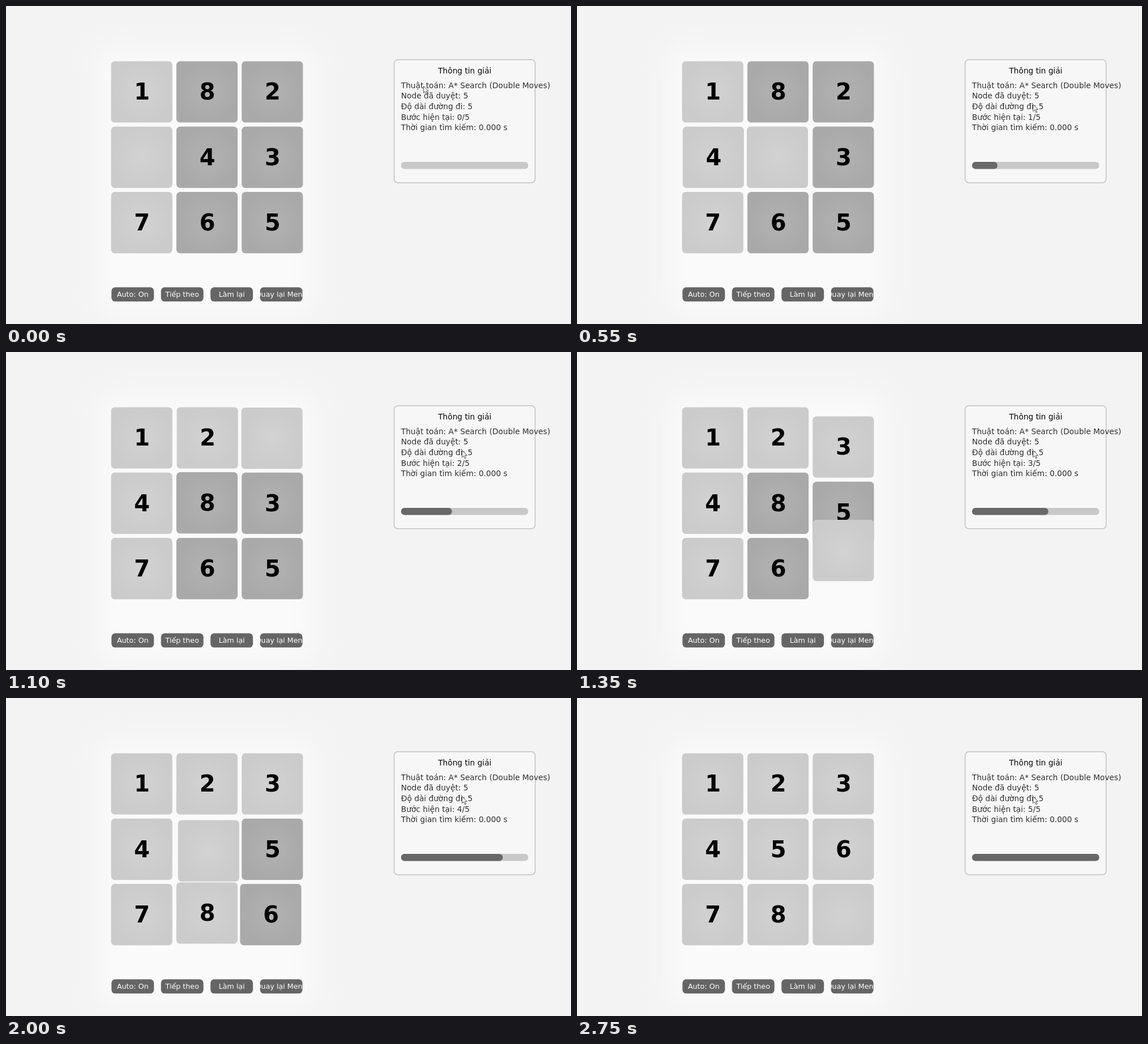
Recreate the animation shown at these times as an HTML page. Size 998 by 561 pixels, loop 2900 ms.

```html
<!DOCTYPE html>
<html lang="vi">
<head>
<meta charset="utf-8">
<title>8-puzzle</title>
<style>
html, body { margin: 0; width: 100%; height: 100%; overflow: hidden; background: #f3f3f3; }
svg { display: block; width: 998px; height: 561px; font-family: "DejaVu Sans", sans-serif; }
.num { font-size: 40px; font-weight: bold; text-anchor: middle; }
.info { font-size: 13.72px; fill: #303030; }
.title { font-size: 13.72px; text-anchor: middle; fill: #080808; }
.btn { font-size: 12.7px; text-anchor: middle; fill: #fff; }
</style>
</head>
<body>
<svg id="stage" viewBox="0 0 998 561">
  <defs>
    <filter id="soft" x="-30%" y="-30%" width="160%" height="160%"><feGaussianBlur stdDeviation="24"/></filter>
    <radialGradient id="light"><stop offset="0" stop-color="#d2d2d2"/><stop offset="1" stop-color="#cbcbcb"/></radialGradient>
    <radialGradient id="dark"><stop offset="0" stop-color="#b2b2b2"/><stop offset="1" stop-color="#a9a9a9"/></radialGradient>
  </defs>
  <rect width="998" height="561" fill="#f3f3f3"/>
  <rect x="165" y="75" width="380" height="470" fill="#fff" opacity=".6" filter="url(#soft)"/>
  <g id="board"></g>
  <g id="buttons"></g>
  <rect x="685.6" y="94.8" width="249" height="217" rx="6.5" fill="#f7f7f7" stroke="#c2c2c2" stroke-width="1.5"/>
  <text class="title" x="810.3" y="119.2">Thông tin giải</text>
  <g id="info"></g>
  <rect x="697.8" y="275" width="224.6" height="12.5" rx="6" fill="#c8c8c8"/>
  <rect id="bar" x="697.8" y="275" height="12.5" rx="6" fill="#686868"/>
  <path id="cursor" d="M0 0V12L2.8 9.5L5 14.2L7 13.3L5 8.8H8.8Z" fill="#f4f4f4" stroke="#555" stroke-width="1" stroke-linejoin="round"/>
</svg>
<script>
const LOOP = 2900, TICK = 50;
const X0 = 185.6, Y0 = 97.4, PITCH = 115.35, SIZE = 108.2;
const GOAL = "123456780";
const BOARDS = ["182043765", "182403765", "120483765", "123485760", "123405786", GOAL];
const STARTS = [170, 680, 1190, 1700, 2195];
const DECAY = 0.54; // share of the distance left after each tick

const $ = id => document.getElementById(id);

function add(parent, tag, attrs, text) {
  const el = document.createElementNS("http://www.w3.org/2000/svg", tag);
  for (const key in attrs) el.setAttribute(key, attrs[key]);
  if (text) el.textContent = text;
  parent.appendChild(el);
  return el;
}

const tiles = [...GOAL].map(value => {
  const group = add($("board"), "g", {});
  const rect = add(group, "rect", { width: SIZE, height: SIZE, rx: 6.6 });
  if (value !== "0") add(group, "text", { class: "num", x: SIZE / 2 + 0.6, y: SIZE / 2 + 13.9 }, value);
  return { value, group, rect };
});

["Auto: On", "Tiếp theo", "Làm lại", "Quay lại Menu"].forEach((label, i) => {
  const x = 186.3 + i * 87.45;
  add($("buttons"), "rect", { x, y: 496.3, width: 75, height: 25, rx: 6.5, fill: "#656565" });
  add($("buttons"), "text", { class: "btn", x: x + 37.5, y: 513.2 }, label);
});

const lines = [
  "Thuật toán: A* Search (Double Moves)",
  "Node đã duyệt: 5",
  "Độ dài đường đi: 5",
  "Bước hiện tại: 0/5",
  "Thời gian tìm kiếm: 0.000 s"
].map((text, i) => add($("info"), "text", { class: "info", x: 697.8, y: 144.5 + i * 18.73 }, text));

const cell = i => [X0 + (i % 3) * PITCH, Y0 + Math.floor(i / 3) * PITCH];

function drawBoard(step, t) {
  const now = BOARDS[step], before = BOARDS[Math.max(0, step - 1)];
  let left = step ? DECAY ** ((t - STARTS[step - 1]) / TICK) : 0;
  if (left * PITCH < 0.3) left = 0;
  for (const { value, group, rect } of tiles) {
    const at = now.indexOf(value);
    const [x1, y1] = cell(at), [x0, y0] = cell(before.indexOf(value));
    const x = x1 + (x0 - x1) * left, y = y1 + (y0 - y1) * left;
    group.setAttribute("transform", `translate(${x.toFixed(2)} ${y.toFixed(2)})`);
    const fits = value === "0" || GOAL[at] === value;
    rect.setAttribute("fill", fits ? "url(#light)" : "url(#dark)");
  }
}

// tiles stack in the reading order of the current board
function stack(step) {
  for (const value of BOARDS[step]) $("board").appendChild(tiles[GOAL.indexOf(value)].group);
}

let shown = -1;
function draw(time) {
  const t = Math.floor((time % LOOP) / TICK) * TICK;
  const step = STARTS.filter(s => s <= t).length;
  if (step !== shown) {
    stack(step);
    lines[3].textContent = `Bước hiện tại: ${step}/5`;
    $("bar").setAttribute("width", 224.6 * step / 5);
    shown = step;
  }
  drawBoard(step, t);
  const p = Math.min(1, Math.max(0, t / 500));
  const e = p * p * (3 - 2 * p);
  $("cursor").setAttribute("transform", `translate(${737.6 + 68 * e} ${141.3 + 32.4 * e})`);
}

let begin;
function frame(now) {
  begin ??= now;
  draw(Math.max(0, now - begin));
  requestAnimationFrame(frame);
}
draw(0);
requestAnimationFrame(frame);
</script>
</body>
</html>
```
